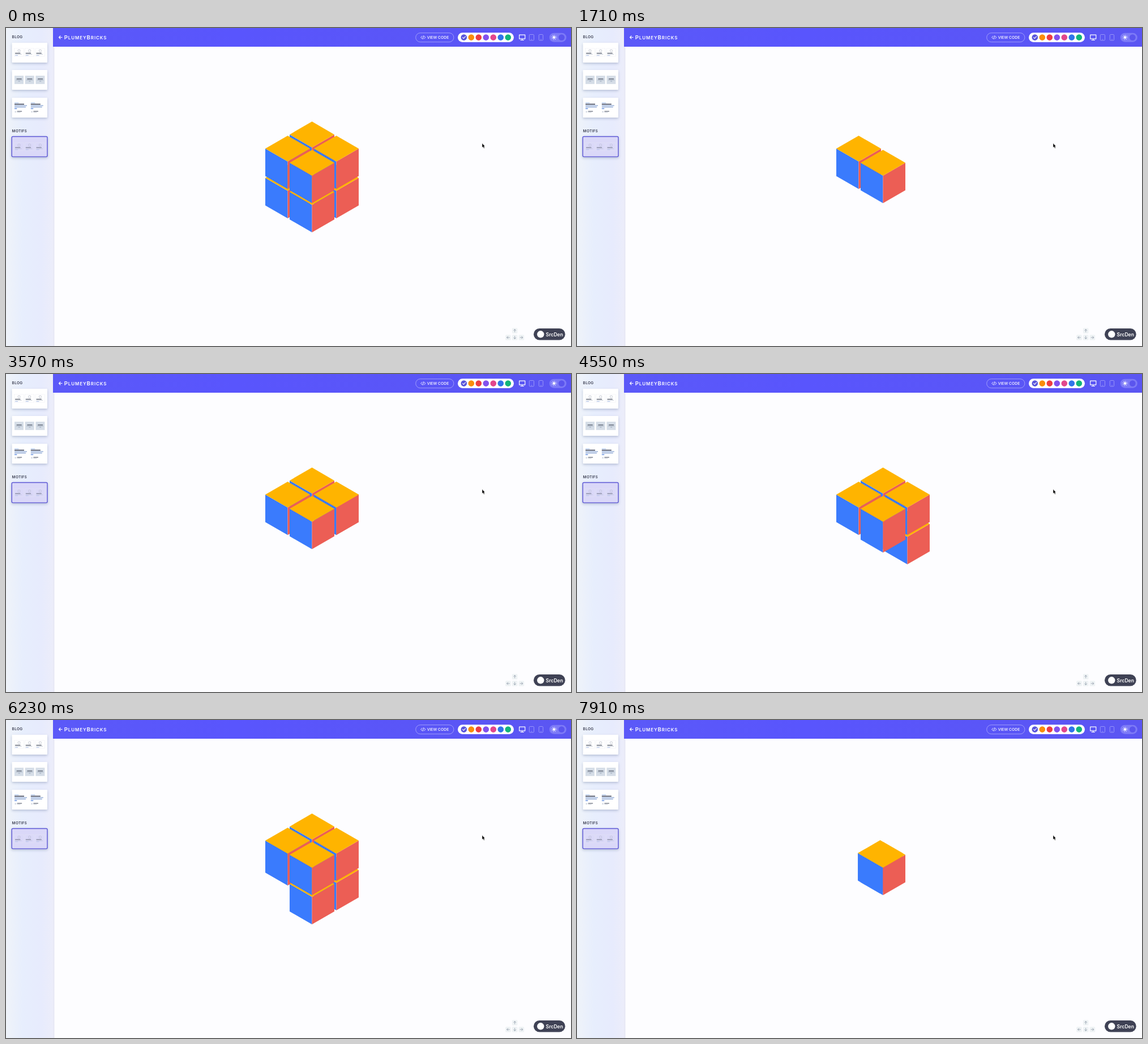
These frames come from a looping animation (998x561 px, 8 s). An HTML page:

```html
<!DOCTYPE html>
<html lang="en">
<head>
<meta charset="utf-8">
<title>Block builder</title>
<style>
  html, body { margin: 0; width: 100%; height: 100%; overflow: hidden; background: #fdfdff; }
  svg { display: block; width: 100vw; height: 100vh; }
  text { font-family: Inter, Roboto, sans-serif; font-weight: 600; }
  .line { fill: none; stroke-linecap: round; stroke-linejoin: round; }
  .card { fill: #fff; filter: drop-shadow(0 2px 2px rgba(70, 90, 130, .3)); }
</style>
</head>
<body>
<svg viewBox="0 0 998 561">
  <defs>
    <linearGradient id="side">
      <stop offset="0" stop-color="#eff3f9"/>
      <stop offset=".35" stop-color="#e7eefd"/>
      <stop offset=".75" stop-color="#e7ebfd"/>
      <stop offset="1" stop-color="#ecedfa"/>
    </linearGradient>
    <linearGradient id="edge">
      <stop offset="0" stop-color="#dcdef0"/>
      <stop offset="1" stop-color="#fdfdff"/>
    </linearGradient>
    <linearGradient id="bar">
      <stop offset="0" stop-color="#5b59f8"/>
      <stop offset=".35" stop-color="#5955fd"/>
      <stop offset="1" stop-color="#5b56f2"/>
    </linearGradient>
    <g id="columns"></g>
  </defs>

  <rect width="998" height="561" fill="#fdfdff"/>
  <rect width="83.5" height="561" fill="url(#side)"/>
  <rect x="83.5" width="3" height="561" fill="url(#edge)"/>
  <rect x="83" width="915" height="33" fill="url(#bar)"/>

  <g fill="#3f4254" font-size="6.6" letter-spacing=".2">
    <text x="10.6" y="17.6">BLOG</text>
    <text x="10.6" y="183.9">MOTIFS</text>
  </g>
  <rect class="card" x="10.5" y="26" width="62.5" height="35" rx="1"/>
  <rect class="card" x="10.5" y="74" width="62.5" height="35" rx="1"/>
  <rect class="card" x="10.5" y="123" width="62.5" height="35" rx="1"/>
  <rect class="card" x="10.2" y="191.5" width="62.8" height="35.6" rx="2"
    style="fill:#dad8f8;stroke:#5c57d6;stroke-width:1.4"/>
  <use href="#columns"/>
  <use href="#columns" y="166.4" opacity=".65"/>
  <g id="tiles"></g>
  <g id="posts"></g>

  <path class="line" d="M99 16.5H93.5M96 14L93.5 16.5L96 19" stroke="#fff" stroke-width="1.1"/>
  <text y="20" fill="#fff" font-size="7.9" letter-spacing=".95"><tspan x="102.7" font-size="9.6">P</tspan>LUMEY<tspan font-size="9.6">B</tspan>RICKS</text>

  <rect x="723.7" y="8.7" width="67.2" height="16" rx="8" fill="none" stroke="#a5a3fa" stroke-width=".9"/>
  <path class="line" d="M735 14.3L732.8 16.6L735 18.9M738.6 14.3L740.8 16.6L738.6 18.9M737.5 13.8L736.2 19.3" stroke="#fff" stroke-width=".9"/>
  <text x="743.7" y="19" fill="#fff" font-size="6.8" style="font-weight:500">VIEW CODE</text>

  <rect x="798" y="8.3" width="99" height="16.6" rx="8.3" fill="#fff"/>
  <g id="swatches"></g>
  <path class="line" d="M806.5 16.6L808.3 18.4L811.6 14.8" stroke="#fff" stroke-width="1.1"/>

  <path class="line" d="M906.7 12.2H916.8V19.1H906.7ZM911.7 19.1V21.4M909 21.5H914.5" stroke="#fff" stroke-width="1.2"/>
  <g fill="none" stroke="#a09efa" stroke-width=".9">
    <rect x="924.3" y="11.5" width="8.2" height="10.3" rx="1.3"/>
    <rect x="941.3" y="11.5" width="7.3" height="10.3" rx="1.3"/>
    <path d="M927.7 20H929.1M944.3 20H945.7"/>
  </g>
  <rect x="959.8" y="8.7" width="30" height="16" rx="8" fill="#7d7af7"/>
  <circle cx="981.3" cy="16.6" r="5.4" fill="#5b55ee"/>
  <circle cx="968" cy="16.6" r="2.4" fill="#fff"/>
  <circle cx="968" cy="16.6" r="3.8" fill="none" stroke="#fff" stroke-width="1.2" stroke-dasharray="1 1.985"/>

  <g id="keys"></g>
  <rect x="932" y="530" width="55.7" height="20.6" rx="10.3" fill="#3f4255"/>
  <circle cx="944.3" cy="540.3" r="6.2" fill="#fff"/>
  <text x="953.6" y="543.5" fill="#fff" font-size="8.6">SrcDen</text>

  <g id="cubes"></g>
  <path d="M841 203.3V211L842.7 209.5L844 212.2L845.4 211.5L844.2 209H846.2Z" fill="#000" stroke="#fff" stroke-width=".5"/>
</svg>

<script>
const $ = id => document.getElementById(id);

function add(parent, tag, attrs) {
  const el = document.createElementNS('http://www.w3.org/2000/svg', tag);
  for (const key in attrs) el.setAttribute(key, attrs[key]);
  return parent.appendChild(el);
}
const bar = (parent, x, y, width, height, fill) => add(parent, 'rect', { x, y, width, height, fill });

// Sidebar thumbnails
for (const x of [14.7, 33.4, 52.1]) {
  const cols = $('columns');
  add(cols, 'rect', { x, y: 36, width: 16.4, height: 14, fill: 'none', stroke: '#e9ebf1', 'stroke-width': .5 });
  add(cols, 'rect', { x: x + 6.4, y: 38.3, width: 3.8, height: 3.8, rx: 1, fill: 'none', stroke: '#a4abba', 'stroke-width': .6 });
  bar(cols, x + 1.4, 43.9, 9.3, 1.2, '#4b5262');
  bar(cols, x + 1.4, 46.2, 11.5, .7, '#a9b2c2');
  bar(cols, x + 1.4, 48.1, 5, .7, '#8fa9de');

  const tiles = $('tiles');
  bar(tiles, x + .3, 84.2, 16, 14.6, '#d5dde7');
  bar(tiles, x + 4, 89.3, 9, 1.2, '#4b5262');
  bar(tiles, x + 3, 91.7, 11, .7, '#98a3b4');
  bar(tiles, x + 7, 93.6, 3, .7, '#8190a8');
}
for (const x of [15, 43.8]) {
  const posts = $('posts');
  bar(posts, x, 131.6, 7.5, .9, '#8db0ea');
  bar(posts, x, 133.7, 17, 1.5, '#343b50');
  bar(posts, x, 136.4, 22, 1, '#6488c6');
  bar(posts, x, 138.9, 20, 1, '#6488c6');
  bar(posts, x, 141.6, 4.5, 1.2, '#3e73d6');
  add(posts, 'circle', { cx: x + 1.8, cy: 147.9, r: 1.4, fill: '#d3d8e1' });
  bar(posts, x + 4.6, 146.5, 8.5, 1, '#444b5c');
  bar(posts, x + 4.6, 148.5, 6, .7, '#a9b2c2');
}

['#5a55dc', '#fa8d0a', '#ee3d42', '#8251ee', '#e2478d', '#2f75ea', '#12b57a']
  .forEach((fill, i) => add($('swatches'), 'circle', { cx: 808.8 + 13 * i, cy: 16.6, r: 5.3, fill }));

for (const [x, y, turn] of [[898.7, 534, 0], [887, 546, -90], [898.7, 546, 180], [910.4, 546, 90]]) {
  const key = add($('keys'), 'g', { transform: `translate(${x} ${y}) rotate(${turn})` });
  add(key, 'rect', { x: -4.8, y: -4.8, width: 9.6, height: 9.6, rx: 1.5, fill: '#eff3f5' });
  add(key, 'path', { class: 'line', d: 'M0 2.3V-2.3M-2 -.4L0 -2.3L2 -.4', stroke: '#8d98a8', 'stroke-width': .8 });
}

// Cubes: each grows out of its parent by one grid step
const LOOP = 8000, CYCLE = 6720, GROW = 667;
const FOLD_START = 105, FOLD = 620;
const HALF_W = 39.5, HALF_H = 22.8, SIDE = 48.5;
const GAP_X = 43, GAP_Y = 24.9, DROP = 51.6;

const cubes = {
  front:     { from: null },
  left:      { from: 'front', start: 1049, step: [-GAP_X, -GAP_Y] },
  back:      { from: 'left',  start: 1889, step: [GAP_X, -GAP_Y] },
  right:     { from: 'back',  start: 2729, step: [GAP_X, GAP_Y] },
  rightLow:  { from: 'right', start: 3569, step: [0, DROP] },
  frontLow:  { from: 'front', start: 4409, step: [0, DROP] },
  backLow:   { from: 'back',  start: 5249, step: [0, DROP] },
  leftLow:   { from: 'left',  start: 6065, step: [0, DROP] }
};
const paintOrder = ['backLow', 'rightLow', 'leftLow', 'frontLow', 'back', 'right', 'left', 'front'];

for (const name of paintOrder) {
  const g = cubes[name].el = add($('cubes'), 'g', {});
  const face = (fill, d) => add(g, 'path', { fill, d });
  face('#3a7bfd', `M${-HALF_W} ${-HALF_H}L0 0V${SIDE}L${-HALF_W} ${SIDE - HALF_H}Z`);
  face('#ec5e55', `M${HALF_W} ${-HALF_H}L0 0V${SIDE}L${HALF_W} ${SIDE - HALF_H}Z`);
  face('#ffb400', `M0 0L${HALF_W} ${-HALF_H}L0 ${-2 * HALF_H}L${-HALF_W} ${-HALF_H}Z`);
}

const ease = p => {
  p = Math.min(1, Math.max(0, p));
  return p * p * (3 - 2 * p);
};

// The picture advances in an uneven 20-20-100 ms rhythm
function hold(t) {
  const phase = (t + 110) % 140;
  return Math.max(0, t - phase + Math.min(40, Math.floor(phase / 20) * 20));
}

function draw(t) {
  const time = hold(t) % CYCLE;
  const folding = time < FOLD_START + FOLD;
  const spread = folding ? 1 - ease((time - FOLD_START) / FOLD) : 1;
  for (const name in cubes) {
    const cube = cubes[name];
    const parent = cubes[cube.from];
    if (!parent) {
      cube.pos = [0, 0];
    } else {
      const grown = folding ? spread : ease((time - cube.start) / GROW);
      cube.pos = cube.step.map((d, i) => parent.pos[i] + d * grown);
      cube.el.style.display = grown > 0 ? '' : 'none';
    }
    cube.el.setAttribute('transform', `translate(${540.5 + cube.pos[0]} ${260.5 + cube.pos[1]})`);
  }
}

const began = performance.now();
function tick() {
  draw((performance.now() - began) % LOOP);
  requestAnimationFrame(tick);
}
tick();
</script>
</body>
</html>
```
